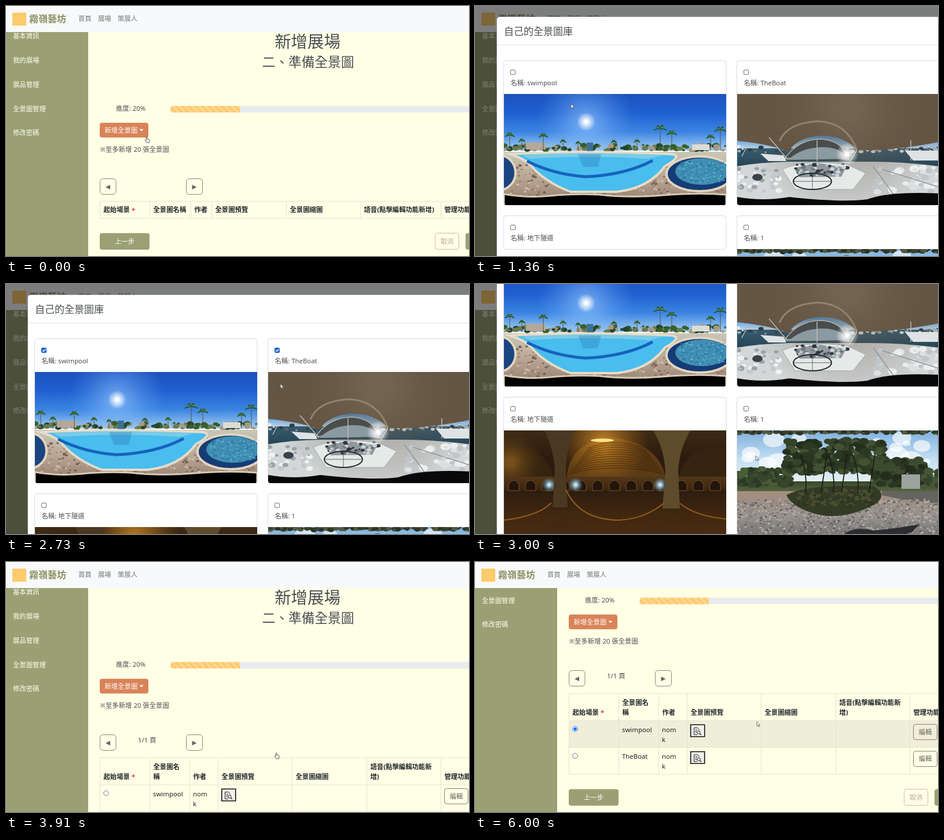
Recreate the animation shown at these times as an HTML page with a canvas. Size 800 by 432 pixels, loop 6.09 s.

```html
<!DOCTYPE html>
<html lang="zh-Hant">
<head>
<meta charset="utf-8">
<style>
html, body { margin: 0; width: 100%; height: 100%; overflow: hidden; background: #ffffe6; }
canvas { display: block; width: 800px; height: 432px; }
</style>
</head>
<body>
<canvas id="stage" width="800" height="432"></canvas>
<script>
const LOOP = 6090, STEP = 1000 / 11;
const OLIVE = '#9aa073', PAGE = '#ffffe6', GREY = '#6c757d', INK = '#212529', LINE = '#dee2e6';
const FONT = '"Noto Sans", "Noto Sans CJK TC", "Noto Sans CJK JP", sans-serif';
const BODY = 11.36;
const OPEN_MENU = 85, OPEN_MODAL = 900, CLOSE_MODAL = 3900;
const stage = document.getElementById('stage').getContext('2d');
let c = stage;

const clamp = v => Math.max(0, Math.min(1, v));
const easeOut = v => 1 - (1 - clamp(v)) ** 2;
const easeInOut = v => clamp(v) ** 2 * (3 - 2 * clamp(v));

// Linear interpolation through [time, x, y] keys
function track(keys, t) {
  const i = keys.findIndex(k => k[0] > t);
  if (i < 0) return keys[keys.length - 1].slice(1);
  const a = keys[i - 1], b = keys[i], p = (t - a[0]) / (b[0] - a[0]);
  return [a[1] + (b[1] - a[1]) * p, a[2] + (b[2] - a[2]) * p];
}

const CURSOR_PATH = [
  [0, 243, 225], [90, 242, 225], [640, 224, 276], [730, 223, 275], [910, 223, 275], [1000, 242, 213],
  [1090, 242, 213], [1720, 67, 112], [1910, 69, 112], [2090, 437, 165], [2180, 437, 165],
  [2450, 468, 113], [2640, 468, 113], [2910, 487, 297], [3000, 485, 297], [3270, 475, 301],
  [3360, 468, 317], [3450, 468, 317], [3540, 467, 329], [4170, 467, 329], [4450, 392, 329],
  [4730, 221, 283], [4820, 221, 283], [5180, 171, 285], [5360, 171, 285], [5910, 486, 277], [6000, 487, 276]
];
const cursorAt = t => track(CURSOR_PATH, t);
const pageScroll = t => Math.round(111 * easeInOut((t - 4130) / 300));
const modalScroll = t => 351 * easeInOut((t - 2748) / 520);

function text(s, x, y, { size = BODY, color = '#4a4e50', weight = 400, align = 'left' } = {}) {
  c.font = `${weight} ${size}px ${FONT}`;
  c.fillStyle = color;
  c.textAlign = align;
  c.fillText(s, x, y + size * .37);
}

function paint(path, fill, stroke, width = 1) {
  if (fill) { c.fillStyle = fill; c.fill(path); }
  if (stroke) { c.strokeStyle = stroke; c.lineWidth = width; c.stroke(path); }
}

function box(x, y, w, h, r, ...style) {
  const p = new Path2D();
  p.roundRect(x, y, w, h, r);
  paint(p, ...style);
}

function oval(x, y, rx, ry, ...style) {
  const p = new Path2D();
  p.ellipse(x, y, rx, ry, 0, 0, Math.PI * 2);
  paint(p, ...style);
}

const shape = (d, ...style) => paint(new Path2D(d), ...style);

function button(x, y, w, h, label, fill, stroke, color) {
  box(x, y, w, h, 4, fill, stroke);
  text(label, x + w / 2, y + h / 2, { color, align: 'center' });
}

function shade(x, y, w, h, colors) {
  const g = c.createLinearGradient(0, y, 0, y + h);
  colors.forEach((col, i) => g.addColorStop(i / (colors.length - 1), col));
  c.fillStyle = g;
  c.fillRect(x, y, w, h);
}

function glow(x, y, r, inner, outer) {
  const g = c.createRadialGradient(x, y, 0, x, y, r);
  g.addColorStop(0, inner);
  g.addColorStop(.12, inner);
  g.addColorStop(1, outer);
  c.fillStyle = g;
  c.fillRect(x - r, y - r, r * 2, r * 2);
}

let seed = 7;
const random = () => (seed = seed * 16807 % 2147483647) / 2147483647;

function scatter(n, x, y, w, h, r, colors) {
  for (let i = 0; i < n; i++) {
    const size = r * (.5 + random());
    oval(x + random() * w, y + random() * h, size, size * .7, colors[i % colors.length]);
  }
}

function palm(x, y, h) {
  shape(`M${x} ${y}v${-h}`, null, '#5d5138');
  for (let i = 0; i < 7; i++) {
    const a = Math.PI * (1 + i / 6), r = h * .3;
    const dx = Math.cos(a) * r, dy = Math.sin(a) * r;
    shape(`M${x} ${y - h}q${dx * .6} ${dy} ${dx} ${dy * .5 + 3}`, null, i % 2 ? '#5c8a35' : '#1f4a23', 1.4);
  }
}

function makePhoto(drawScene) {
  const canvas = document.createElement('canvas');
  canvas.width = 384;
  canvas.height = 192;
  c = canvas.getContext('2d');
  drawScene();
  c = stage;
  return canvas;
}

const pool = makePhoto(() => {
  shade(0, 0, 384, 98, ['#1c52bd', '#1f60d0', '#3b84e2', '#a5cff0']);
  glow(142, 48, 85, 'rgba(150,200,255,.6)', 'rgba(90,160,245,0)');
  glow(142, 48, 16, '#ffffff', 'rgba(255,255,255,0)');
  scatter(130, 0, 88, 384, 9, 4, ['#24452a', '#37602c', '#6b7a50', '#a59a84']);
  box(38, 84, 34, 12, 0, '#b5a898');
  box(325, 87, 30, 10, 0, '#dcdcd6');
  box(143, 84, 11, 18, 0, '#3e6f93');
  [[10, 27], [31, 18], [68, 26], [102, 17], [128, 14], [190, 16], [230, 17], [270, 38], [290, 30], [357, 24], [374, 36]]
    .forEach(([x, h]) => palm(x, 98, h));
  shade(0, 100, 384, 92, ['#c9c6b6', '#b9a692', '#927b6c']);
  scatter(450, 0, 112, 384, 64, 2, ['#86695b', '#cbb8a5', '#776055', '#a98f7e']);
  shape('M10 104Q140 97 290 104Q310 107 278 125Q250 163 195 169H115Q70 152 45 122Q32 110 10 104Z', '#48bdee', '#e6dcc8', 4);
  shape('M30 106Q140 99 275 106L250 112Q140 105 45 112Z', '#7ccbe6');
  shape('M128 104h40l-6 22h-25z', 'rgba(45,120,180,.35)');
  shape('M40 116Q85 139 141 143Q210 140 257 115', null, '#1762bd', 5);
  oval(338, 138, 57, 30, '#163c75', '#e2d5c0', 4);
  oval(342, 134, 46, 23, '#3f8fb4');
  scatter(160, 302, 117, 80, 36, 1.3, ['#2c6f9c', '#65b4cd']);
  oval(-8, 136, 28, 30, '#1b4580', '#e2d5c0', 4);
  shape('M0 173Q40 180 80 176T165 174Q215 180 275 175T384 174V196H0Z', '#000', '#d8cab5', 3);
});

const boat = makePhoto(() => {
  shade(0, 72, 384, 24, ['#3d8bd4', '#c4def2']);
  shade(0, 94, 384, 40, ['#375b70', '#1f4050']);
  scatter(90, 0, 91, 384, 10, 3, ['#e5e8e8', '#59696f', '#2b3b44', '#a9b6bb']);
  shape('M0 125Q40 118 90 117H230Q300 117 384 130V192H0Z', '#d3d7d8');
  shape('M0 0H384V75Q285 99 207 97Q185 72 145 72Q105 74 88 100Q65 88 0 81Z', '#665644');
  glow(190, 25, 190, 'rgba(125,110,90,.55)', 'rgba(80,65,48,0)');
  shape('M73 82Q86 50 140 47Q190 50 207 97', null, '#8f8471', 3);
  shape('M82 112Q105 78 145 78Q182 80 193 114Q140 104 82 112Z', '#4a4d4b', '#b5b0a5', 1.5);
  shape('M88 114Q110 93 145 92T190 112Z', '#8b9aa0');
  shape('M55 75L88 114M207 97L190 125M20 84L8 108M138 80V116M300 80V115', null, '#b9bab6', 1.5);
  shape('M290 98h70l24 7v10h-80zM40 103l40 3 5 10H54z', '#dfe3e5');
  shape('M78 130Q120 112 190 122L222 137 200 165H100Z', '#e6e9e8', '#9fa9ad');
  shape('M98 128l40-9 50 8-8 16-72 1z', '#8f999d');
  scatter(45, 100, 121, 90, 20, 3, ['#30373c', '#6d777c', '#cdd4d7']);
  scatter(40, 0, 128, 75, 40, 4, ['#f0f2f1', '#9aa3a6', '#c3c9cb']);
  scatter(40, 240, 125, 140, 45, 6, ['#eceeee', '#c0c6c9', '#dde0e1']);
  oval(130, 151, 33, 14, null, '#272a2c', 2);
  shape('M98 151h64M130 138v26', null, '#606668');
  oval(35, 144, 9, 6, '#39434a');
  shape('M235 125L275 180M250 130L384 172', null, '#8e979d', 1.5);
  glow(190, 104, 20, '#ffffff', 'rgba(255,255,255,0)');
  shape('M0 178Q45 186 90 178Q180 188 225 182Q270 165 384 174V192H0Z', '#080808');
});

const tunnel = makePhoto(() => {
  shade(0, 0, 384, 192, ['#3d2a15', '#2c1c0f', '#2a1b10', '#40270f', '#4d2d14']);
  shape('M108 84Q112 20 185 12Q268 20 280 84Z', '#5a3a14');
  shape('M0 80V32Q65 15 85 80ZM384 80V30Q315 25 302 80Z', '#35240f');
  glow(172, 22, 80, 'rgba(215,145,40,.75)', 'rgba(150,90,20,0)');
  glow(10, 55, 55, 'rgba(160,110,35,.6)', 'rgba(100,60,20,0)');
  for (let i = 0; i < 12; i++) {
    shape(`M${112 + i * 3} ${75 - i * 4}Q190 ${55 - i * 4} ${276 - i * 3} ${75 - i * 4}`, null, 'rgba(35,18,5,.4)', 1.5);
  }
  oval(170, 17, 20, 3, '#ffe08a');
  shade(0, 80, 384, 24, ['#54371a', '#3a230f']);
  for (let x = 8; x < 384; x += 29) shape(`M${x} 104V93q9-14 18 0V104Z`, '#21150c', '#7a5226');
  [78, 124, 270].forEach(x => glow(x, 94, 13, '#c7ecff', 'rgba(70,130,160,0)'));
  shape('M70 0H122Q107 32 107 70L110 133H84L88 70Q86 32 70 0Z', '#4b3822');
  shape('M258 0H322Q302 35 301 72L304 135H274L279 72Q277 32 258 0Z', '#5e4b2b');
  shape('M107 102Q130 155 200 155Q245 152 276 126M0 155Q60 148 82 125M304 126Q330 148 384 153', null, '#8f5c22', 2);
  shape('M95 158Q160 180 270 166L384 192H0Z', 'rgba(65,40,23,.5)');
});

const park = makePhoto(() => {
  shade(0, 0, 384, 100, ['#7fb0dd', '#c3dff3', '#eef3f4']);
  scatter(25, 0, 12, 384, 45, 14, ['rgba(255,255,255,.65)']);
  scatter(160, 0, 0, 384, 5, 4, ['#39422f', '#4f5a40', '#2c3425']);
  shade(0, 88, 384, 22, ['#36482a', '#5f6c45']);
  scatter(130, 0, 66, 90, 28, 6, ['#35462b', '#4a5c38', '#2a3a24']);
  scatter(320, 85, 18, 170, 55, 7, ['#232e1c', '#35432a', '#435232', '#2b3822']);
  scatter(170, 235, 50, 95, 45, 7, ['#2a3723', '#222d1c', '#3c4b2e']);
  scatter(60, 320, 70, 64, 28, 6, ['#34452b', '#465737']);
  box(284, 76, 32, 25, 0, '#9ba39f');
  shade(0, 105, 384, 87, ['#a58e80', '#95918e', '#6e6d6e']);
  shape('M250 105H384V125Q320 128 250 112Z', '#65645f');
  scatter(1400, 0, 118, 384, 72, 1.7, ['#aaa6a1', '#5f5f62', '#b9b1a8', '#857a74']);
  shape('M85 112Q105 99 170 96H235Q262 110 238 128Q175 160 125 141Q95 131 85 112Z', '#343b25');
  scatter(130, 105, 102, 130, 28, 3, ['#47502f', '#2e3523', '#4d4c30']);
  [118, 145, 166, 180, 208, 228].forEach((x, i) =>
    shape(`M${x} 108Q${x + 4} 80 ${x + (i % 2 ? 10 : -8)} 42`, null, '#1d1d16', 1.8));
  shape('M170 192Q195 162 235 173Q280 169 315 162L302 176Q260 185 384 188V192Z', '#2c2d30');
});

function tableGrid(columns, rows) {
  const last = rows[rows.length - 1];
  columns.forEach(x => shape(`M${x + .5} ${rows[0]}V${last}`, null, '#e4e3d3'));
  rows.forEach(y => shape(`M162 ${y}H800`, null, '#e4e3d3'));
}

// The row under the cursor is tinted; the tint trails off for one step
function rowTint(y, t) {
  const over = time => {
    const offset = cursorAt(time)[1] + pageScroll(time) - y;
    return offset >= 0 && offset < 46.5;
  };
  return over(t) ? .075 : over(t - STEP) ? .05 : 0;
}

function tableRow(y, name, t, chosen) {
  c.fillStyle = `rgba(40,30,40,${rowTint(y, t)})`;
  c.fillRect(162, y, 638, 46.5);
  oval(173, y + 14.5, 4.2, 4.2, '#fff', chosen ? '#0d6efd' : '#767676');
  if (chosen) oval(173, y + 14.5, 2.6, 2.6, '#0d6efd');
  text(name, 254, y + 15.5, { color: INK });
  text('nom', 323, y + 15.5, { color: INK });
  text('k', 323, y + 32.5, { color: INK });
  box(372.7, y + 7.2, 24, 20.5, 0, '#f1f1ec', '#111', 1.6);
  c.save();
  c.translate(378, y + 12);
  shape('M9 4.5V3L6.5 .5H.5V12.5H6M2.5 4H6M2.5 6.5H5M2.5 9H5', null, '#222');
  oval(8.5, 8.5, 2.7, 2.7, null, '#222');
  shape('M10.5 10.5l2.5 2.5', null, '#222', 1.3);
  c.restore();
  button(757.5, y + 6.5, 41, 26.5, '編輯', null, '#8c7b70', '#6b6864');
}

function drawTable(t, filled) {
  const top = filled ? 338.5 : 337.5;
  const cols = filled ? [162, 248, 317, 366, 494, 623, 751] : [162, 248, 319, 355, 484, 612, 751];
  const heads = ['起始場景', filled ? '全景圖名|稱' : '全景圖名稱', '作者', '全景圖預覽', '全景圖縮圖',
    filled ? '語音(點擊編輯功能新|增)' : '語音(點擊編輯功能新增)', '管理功能'];
  const bottom = top + (filled ? 46.5 : 29);
  if (filled) {
    tableRow(bottom, 'swimpool', t, t >= 5350);
    tableRow(bottom + 46.5, 'TheBoat', t, false);
  }
  tableGrid(cols, filled ? [top, bottom, bottom + 46, bottom + 93] : [top, bottom]);
  heads.forEach((head, i) => {
    const lines = head.split('|');
    lines.forEach((s, j) =>
      text(s, cols[i] + 6.5, bottom - 14.5 - (lines.length - 1 - j) * 17, { color: INK, weight: 700 }));
  });
  text('*', 217, bottom - 14, { color: '#dc3545', weight: 700 });
}

function drawDropdown() {
  box(162.5, 229.5, 138, 88, 4, '#fff', '#d2d2ca');
  box(163, 262, 137, 24, 0, '#e9ecef');
  ['上傳新的全景圖', '從自己的全景圖庫新增', '從公開的全景圖庫新增']
    .forEach((s, i) => text(s, 174, 249.5 + i * 24.5, { color: INK }));
}

function drawProgress() {
  box(284.5, 172.7, 560, 11.4, 4, '#e9ecef');
  c.save();
  c.beginPath();
  c.roundRect(284.5, 172.7, 119.5, 11.4, [4, 0, 0, 4]);
  c.clip();
  c.fillStyle = '#fec96e';
  c.fillRect(284, 172, 121, 13);
  for (let x = 273; x < 406; x += BODY) shape(`M${x} 172.7h5.7l11.4 11.4h-5.7z`, '#fed78f');
  c.restore();
}

function drawPage(t) {
  const filled = t >= CLOSE_MODAL;
  c.fillStyle = PAGE;
  c.fillRect(0, 0, 800, 432);
  c.fillStyle = OLIVE;
  c.fillRect(0, 45, 142, 387);
  c.save();
  c.translate(0, -pageScroll(t));

  ['基本資訊', '我的展場', '展品管理', '全景圖管理', '修改密碼']
    .forEach((s, i) => text(s, 12, 52 + i * 41.8, { color: '#fffff2' }));
  text('新增展場', 521, 61, { size: 28.4, weight: 300, align: 'center' });
  text('二、準備全景圖', 522, 96.5, { size: 22.7, weight: 300, align: 'center' });
  text('進度: 20%', 190, 176.5);
  drawProgress();

  const active = t >= OPEN_MENU && t < CLOSE_MODAL;
  box(162, 201.7, 84, 25.5, 4, active ? '#c2734b' : '#d98358');
  text('新增全景圖', 170.5, 214.5, { color: '#fff' });
  shape('M230.5 212.7h7l-3.5 3.7z', '#fff');
  text('※至多新增 20 張全景圖', 162.5, 247.5);

  box(162.5, 298.5, 27.5, 27, 5, null, '#858780');
  box(311.5, 298.5, 28, 27, 5, null, '#858780');
  shape('M180 309v8l-8-4zM321.5 309v8l8-4z', '#5f686d');
  if (filled) text('1/1 頁', 228, 307.5);
  drawTable(t, filled);

  const y = filled ? 503.5 : 392.5;
  button(162, y, 86, 28.5, '上一步', OLIVE, null, '#fff');
  button(741.5, y, 41, 28, '取消', null, '#cdbfa9', '#b9aa97');
  box(794, y, 60, 28.5, 4, OLIVE);
  if (t >= OPEN_MENU && t < OPEN_MODAL) drawDropdown();
  c.restore();

  c.fillStyle = '#f8f9fa';
  c.fillRect(0, 0, 800, 45);
  box(11, 11.5, 24, 22.5, 0, '#fbcb6c');
  text('霧嶺藝坊', 40, 22.5, { size: 16, weight: 700, color: '#8b9062' });
  [['首頁', 125], ['展場', 159], ['策展人', 193]].forEach(([s, x]) => text(s, x, 22, { color: '#747576' }));
}

function drawCard(x, y, name, photo, loaded, checked) {
  box(x + .5, y + .5, 384.5, loaded ? 249.5 : 58, 4, '#fff', '#dadbdc');
  if (checked) {
    box(x + 12, y + 16, 9, 9, 2, '#1767d2');
    shape(`M${x + 14} ${y + 20.5}l2 2 3.5-4`, null, '#fff', 1.4);
  } else box(x + 12.5, y + 16.5, 8, 8, 1.5, '#fff', '#767676');
  text('名稱: ' + name, x + 12.5, y + 38.5);
  if (!loaded) return;
  c.save();
  c.beginPath();
  c.roundRect(x + 1, y + 58, 384, 192 * loaded, loaded < 1 ? 0 : [0, 0, 4, 4]);
  c.clip();
  c.drawImage(photo, x + 1, y + 58);
  c.restore();
}

function drawModal(t) {
  const slide = -35.5 * (1 - easeOut((t - 965) / 310));
  c.fillStyle = `rgba(0,0,0,${.5 * clamp((t - 890) / 220)})`;
  c.fillRect(0, 0, 800, 432);
  c.save();
  c.globalAlpha = clamp((t - 951) / 150);
  c.translate(0, Math.round(slide - modalScroll(t)));
  box(37.5, 18.5, 800, 744, 5, '#fff', 'rgba(0,0,0,.2)');
  text('自己的全景圖庫', 50, 44, { size: 17 });
  c.fillStyle = LINE;
  c.fillRect(38, 67, 762, 1);
  c.fillRect(38, 712, 762, 1);
  drawCard(49, 94, 'swimpool', pool, t < 1080 ? 0 : t < 1170 ? .13 : 1, t >= 1810);
  drawCard(452, 94, 'TheBoat', boat, +(t >= 1260), t >= 2440);
  drawCard(49, 362, '地下隧道', tunnel, +(t >= 1540), false);
  drawCard(452, 362, '1', park, +(t >= 1350), false);
  text('1/5頁', 443, 647, { align: 'center' });
  const hovered = t >= 3540 && t < 3720;
  button(183.5, 672, 520, 29, '新增至展場', hovered ? '#8b9167' : OLIVE, null, '#fff');
  box(785.5, 672.5, 70, 28, 4, null, GREY);
  text('下一頁', 795, 687, { color: GREY });
  box(709.5, 724.5, 75, 27, 4, null, GREY);
  text('重新整理', 719.5, 738.5, { color: GREY });
  c.beginPath();
  c.arc(770, 738, 4, -.3, 5.3);
  c.strokeStyle = GREY;
  c.stroke();
  shape('M775 734v4h-4z', GREY);
  box(796.5, 724.5, 60, 27, 4, null, '#b89a83');
  c.restore();
  if (t < 1260) {
    box(-1, 416.5, 121, 17, [0, 3, 0, 0], '#e0e7ee', '#c8ced4');
    text('devmachine:8142/newForm1#', 2, 425, { size: 9, color: '#4d5862' });
  }
}

function drawCursor(t) {
  const [x, y] = cursorAt(t);
  const hand = t < 990 || (t >= 3530 && t < 4170);
  c.save();
  c.translate(x, y);
  if (hand) {
    c.translate(-3, 0);
    shape('M2.2 1.5q.9-1.4 1.8 0v3l3 .7q1.2.4 1 1.6l-.7 4.2H3L.4 7.3q0-1.4 1.2-.7l.6.6z', '#fff', '#444', .9);
  } else shape('M0 0v7.6l1.8-1.5 1.2 2.6 1.2-.5-1.2-2.5h2.4z', '#fff', '#555', .8);
  c.restore();
}

function frame(now) {
  const t = Math.floor((now % LOOP + 5) / STEP) * STEP;
  drawPage(t);
  if (t >= OPEN_MODAL && t < CLOSE_MODAL) drawModal(t);
  drawCursor(t);
  requestAnimationFrame(frame);
}
requestAnimationFrame(frame);
</script>
</body>
</html>
```
